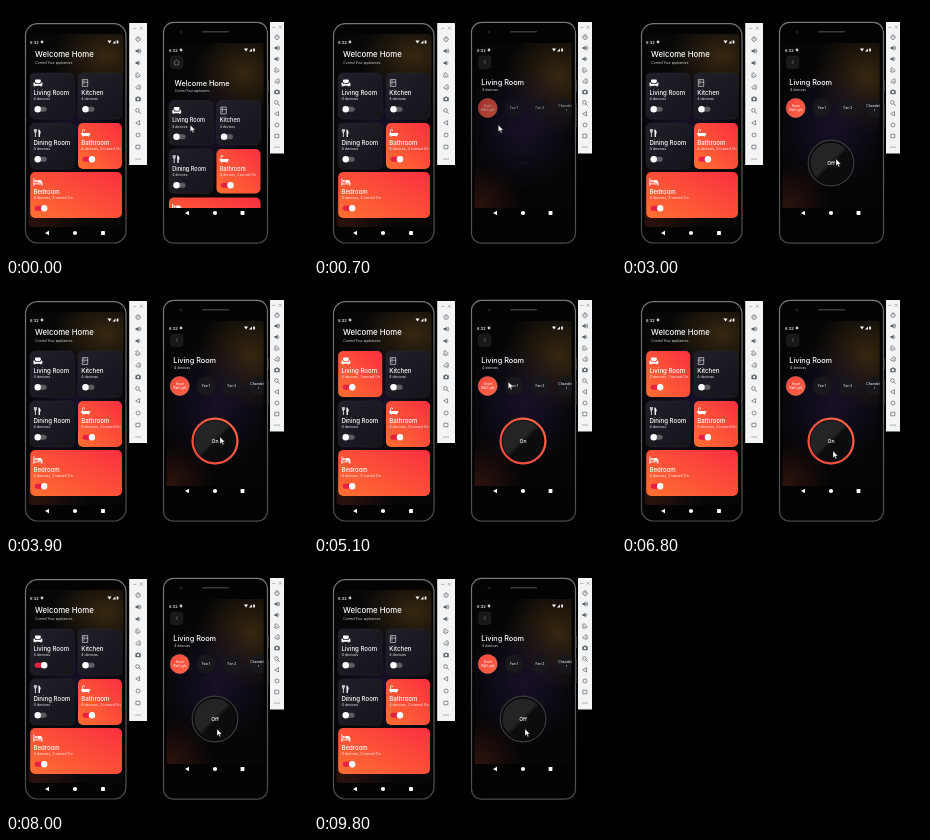
These frames come from a looping animation (302x250 px, 10 s). An HTML page:

```html
<!DOCTYPE html>
<html lang="en">
<head>
<meta charset="utf-8">
<title>Smart home</title>
<style>
html, body { margin: 0; width: 100%; height: 100%; overflow: hidden; background: #000; }
svg { display: block; width: 302px; height: 250px; }
text { font-family: Inter, "Open Sans", sans-serif; fill: #fff; }
</style>
</head>
<body>
<svg id="stage" viewBox="0 0 302 250" xmlns="http://www.w3.org/2000/svg"></svg>
<script>
const LOOP = 10000;

const rect = (x, y, w, h, r, fill, more = '') =>
  `<rect x="${x}" y="${y}" width="${w}" height="${h}" rx="${r}" fill="${fill}" ${more}/>`;
const dot = (x, y, r, fill, more = '') =>
  `<circle cx="${x}" cy="${y}" r="${r}" fill="${fill}" ${more}/>`;
const glowSpot = (x, y, rx, ry, id) =>
  `<ellipse cx="${x}" cy="${y}" rx="${rx}" ry="${ry}" fill="url(#${id})"/>`;
const label = (x, y, size, str, more = '') =>
  `<text x="${x}" y="${y}" font-size="${size}" ${more}>${str}</text>`;
const group = (x, y, body, more = '') =>
  `<g transform="translate(${x} ${y})" ${more}>${body}</g>`;
const line = (d, color = '#fff', w = 0.8) =>
  `<path d="${d}" fill="none" stroke="${color}" stroke-width="${w}" stroke-linecap="round" stroke-linejoin="round"/>`;
const solid = (d, color = '#fff') => `<path d="${d}" fill="${color}"/>`;
const mid = 'text-anchor="middle"';
const bold = 'font-weight="550"';

// Room icons, each in a box of about 9 x 8
const icons = {
  sofa: solid('M1.6 3V1.4Q1.6.5 2.5.5H6.5Q7.4.5 7.4 1.4V3Q6.4 3.2 6.4 4.2H2.6Q2.6 3.2 1.6 3Z') +
    solid('M0 4.3Q0 3.4.9 3.4T1.8 4.3V5H7.2V4.3Q7.2 3.4 8.1 3.4T9 4.3V6.8H8V7.6H7V6.8H2V7.6H1V6.8H0Z'),
  fridge: line('M1.5.6H6.5V7.4H1.5ZM1.5 3.2H6.5M2.8 1.6V2.3M2.8 4.3V5.4', '#ddd', 0.7),
  fork: line('M1 .5V2.5Q1 3.4 2 3.4T3 2.5V.5M2 .5V7.6', '#fff', 0.8) +
    solid('M5 .3Q7.3 1 7.3 4.6H6.5V7.9H5.2Z'),
  bed: line('M.5.8V7.4M.5 5.9H8.5M8.5 7.4V4.4', '#fff', 0.9) +
    dot(2.4, 3.1, 1.1, '#fff') + solid('M4 2H7Q8.8 2.2 8.8 4.8H4Z'),
  bath: line('M1.4 4V1.6Q1.4.6 2.4.6T3.4 1.6', '#fff', 0.8) +
    solid('M0 4H9V5Q9 6.8 7.4 6.9L7.8 7.7H7L6.6 7H2.4L2 7.7H1.2L1.6 6.9Q0 6.8 0 5Z'),
};

const OFF = [92, 92, 98], ON = [230, 32, 66];
const rgb = c => `rgb(${c.map(Math.round).join()})`;

const toggle = (x, y, on, id) => group(x, y,
  rect(0, -2.5, 12, 5, 2.5, rgb(on ? ON : OFF), id && `id="${id}Track"`) +
  dot(on ? 9.5 : 3, 0, 3.2, '#fff', id && `id="${id}Knob"`));

function card({ x, y, w, h, icon, name, size = 6.1, hot, live }) {
  const box = (fill, more = '') => rect(0, 0, w, h, 5, fill, more);
  let body = box(hot ? 'url(#hot)' : 'url(#dark)', hot ? '' : 'stroke="#29282f" stroke-width=".5"');
  if (live) body += box('url(#hot)', 'id="glow"');
  body += group(3.2, 6, icons[icon]) + label(3.2, 21.8, size, name, bold);
  body += label(3.2, 27.2, size * 0.6, hot ? '4 devices, 2 turned On' : '4 devices',
    `fill-opacity=".9" ${live ? 'id="note"' : ''}`);
  body += toggle(4.5, 36.3, hot, live ? 'live' : '');
  return group(x, y, body);
}

const rooms = [
  ['sofa', 'Living Room'], ['fridge', 'Kitchen'],
  ['fork', 'Dining Room'], ['bath', 'Bathroom', true],
];
const cards = (xs, ys, w, h, size, live) => rooms.map(([icon, name, hot], i) =>
  card({ x: xs[i % 2], y: ys[i >> 1], w, h, icon, name, hot, size, live: live && !i })).join('');

const navKeys = (xs, y) =>
  solid(`M${xs[0] + 2} ${y - 2.3}V${y + 2.3}L${xs[0] - 2} ${y}Z`) +
  dot(xs[1], y, 2.1, '#fff') + rect(xs[2] - 1.9, y - 1.9, 3.8, 3.8, 0.4, '#fff');

const status = (x, end, y) =>
  label(x, y + 1.5, 4, '6:32', bold) + dot(x + 12, y, 1.4, '#ccc') +
  solid(`M${end - 8} ${y - 1.5}H${end - 4}L${end - 6} ${y + 1.6}Z`) +
  solid(`M${end - 3} ${y + 1.6}L${end} ${y - 1.6}V${y + 1.6}Z`) +
  rect(end + 1.2, y - 1.6, 1.7, 3.2, 0.3, '#fff');

// Emulator side bar
function sideBar(x, y, w, h, first, step) {
  const ink = '#5b646b';
  const speaker = 'M-2.5-1H-1L.6-2.4V2.4L-1 1H-2.5Z';
  const tools = [
    line('M-1.4-1.5A2.2 2.2 0 1 0 1.4-1.5M0-2.6V0', ink),
    solid(speaker, ink) + line('M1.5-1.2Q2.5 0 1.5 1.2M2.2-2Q3.7 0 2.2 2', ink, 0.6),
    solid(speaker, ink) + line('M1.5-1.2Q2.5 0 1.5 1.2', ink, 0.6),
    line('M-.7-2.2L2.2.7L.7 2.2L-2.2-.7ZM-2.6.8Q-2.3 2.4-.8 2.7', ink),
    line('M.7-2.2L-2.2.7L-.7 2.2L2.2-.7ZM2.6.8Q2.3 2.4.8 2.7', ink),
    rect(-2.7, -1.8, 5.4, 4, 0.6, ink) + rect(-1, -2.5, 2, 1, 0.2, ink) + dot(0, 0.2, 1.1, '#fff'),
    line('M.9.9L2.4 2.4', ink) + dot(-0.6, -0.6, 1.8, 'none', `stroke="${ink}" stroke-width=".7"`),
    line('M1.5-2V2L-2 0Z', ink, 0.7),
    dot(0, 0, 2, 'none', `stroke="${ink}" stroke-width=".7"`),
    line('M-1.8-1.8H1.8V1.8H-1.8Z', ink, 0.7),
    [-2, 0, 2].map(v => dot(v, 0, 0.6, ink)).join(''),
  ];
  const cx = x + w / 2;
  return rect(x, y, w, h, 0.5, '#f3f4f5') +
    line(`M${cx + 2} ${y + 4}l2.4 2.4m0-2.4l-2.4 2.4M${cx - 4.5} ${y + 5.4}h2.5`, '#777', 0.5) +
    tools.map((icon, i) => group(cx, first + i * step, icon)).join('');
}

const blob = (id, color, alpha) =>
  `<radialGradient id="${id}"><stop stop-color="${color}" stop-opacity="${alpha}"/>` +
  `<stop offset="1" stop-color="${color}" stop-opacity="0"/></radialGradient>`;
const ramp = (id, a, b, dir = 'x2="1" y2="1"', from = 0, to = 1) =>
  `<linearGradient id="${id}" ${dir}><stop offset="${from}" stop-color="${a}"/><stop offset="${to}" stop-color="${b}"/></linearGradient>`;
const clip = (id, body) => `<clipPath id="${id}">${body}</clipPath>`;

const defs = '<defs>' +
  ramp('hot', '#ff6f30', '#f92f40', 'x1="0" y1="1" x2="1" y2="0"') + ramp('dark', '#211f29', '#15141b') +
  ramp('ring', '#f0443d', '#ff6545') + ramp('dial', '#242427', '#0c0c0e', 'x2="1" y2="1"', 0.46, 0.54) +
  ramp('rim', '#77787b', '#4a4b4e', 'x2="0" y2="1"') +
  blob('olive', '#3f2d12', 0.85) + blob('violet', '#1d1330', 0.8) + blob('wine', '#35150f', 0.8) +
  clip('leftScreen', rect(22.5, 28, 95, 193, 4, '#fff')) +
  clip('rightScreen', rect(160.5, 37, 97, 165, 0, '#fff')) + '</defs>';

const leftPhone =
  rect(19.5, 17.6, 100.5, 219.4, 12, '#030303', 'stroke="url(#rim)" stroke-width="1.2"') +
  rect(120, 77, 0.9, 14, 0.4, '#444') + rect(120, 99, 0.9, 22, 0.4, '#3a3a3a') +
  '<g clip-path="url(#leftScreen)">' + rect(22, 28, 96, 193, 0, '#070708') +
  glowSpot(100, 50, 56, 40, 'olive') + glowSpot(70, 120, 54, 60, 'violet') +
  glowSpot(30, 215, 50, 36, 'wine') + '</g>' +
  status(24, 109.5, 36) +
  label(29, 51, 7.8, 'Welcome Home', bold) +
  label(29.3, 57.8, 3.3, 'Control Your appliances', 'fill-opacity=".85"') +
  cards([24.2, 72], [67, 117], 44, 46, 6.1, true) +
  card({ x: 24.2, y: 166, w: 91.8, h: 46, icon: 'bed', name: 'Bedroom', hot: true }) +
  navKeys([41, 69, 97], 227);

const cornerButton = icon =>
  rect(164.5, 50, 12.5, 12.5, 3, '#18181b', 'stroke="#2b2b2e" stroke-width=".4"') + line(icon, '#8b8b8e', 0.6);

const homePage =
  glowSpot(238, 67, 52, 46, 'olive') + glowSpot(205, 130, 54, 54, 'violet') +
  cornerButton('M168 56.2L170.7 53.7L173.4 56.2M168.7 56V59H172.7V56') +
  label(168.5, 80, 7.3, 'Welcome Home', bold) +
  label(168.8, 86.4, 3.1, 'Control Your appliances', 'fill-opacity=".85"') +
  cards([163, 210.5], [94.5, 143], 44, 44.5, 5.6) +
  card({ x: 163, y: 191.5, w: 91.5, h: 44, icon: 'bed', name: 'Bedroom', size: 5.6, hot: true });

const chip = (x, lines, on) =>
  dot(x, 102, 9.5, on ? 'url(#ring)' : '#17171c', on ? 'stroke="#ff7a68" stroke-width=".5"' : '') +
  lines.map((s, i) => label(x, 103.2 + (i - (lines.length - 1) / 2) * 3.7, on ? 2.9 : 3.4, s, mid)).join('');

const detailPage = rect(160, 37, 98, 166, 0, '#050506') +
  glowSpot(244, 72, 54, 56, 'olive') + glowSpot(210, 121, 58, 62, 'violet') +
  glowSpot(165, 200, 44, 44, 'wine') +
  cornerButton('M171.6 54.5L169.9 56.2L171.6 57.9') +
  label(167.3, 79, 7.3, 'Living Room', bold) +
  label(168, 84.9, 3.5, '4 devices', 'fill-opacity=".85"') +
  '<g id="chips">' + chip(173.7, ['Smart', 'Wall Light'], true) + chip(200, ['Fan 1']) +
  chip(226, ['Fan 2']) + chip(252.3, ['Chandelie', 'r']) + '</g><g id="dialBox">' +
  dot(209, 157, 22.8, '#09090a', 'stroke="#3a3b3e" stroke-width="1.2"') +
  dot(209, 157, 20.5, 'url(#dial)') +
  dot(209, 157, 22.4, 'none', 'id="ringArc" stroke="url(#ring)" stroke-width="2.2" pathLength="100" transform="rotate(-90 209 157)"') +
  label(209, 158.8, 5.2, 'Off', `id="state" ${bold} ${mid}`) + '</g>';

const rightPhone =
  rect(157.5, 16.4, 104, 220.8, 10, '#030304', 'stroke="url(#rim)" stroke-width="1.2"') +
  rect(261.6, 74, 1, 12, 0.3, '#555') + rect(261.6, 97, 1, 24, 0.3, '#444') +
  rect(196, 25, 27, 1.6, 0.8, '#3a3c40') + dot(175, 26, 1.6, '#1d1f23') +
  '<g clip-path="url(#rightScreen)">' + rect(160, 37, 98, 176, 0, '#060607') +
  homePage + '<g id="detail">' + detailPage + '</g></g>' +
  status(163, 246, 44) + navKeys([181, 209, 236.5], 207);

const pointer = '<g id="pointer"><path transform="scale(.85)" d="M0 0V8L1.9 6.3L3.1 9L4.4 8.4L3.2 5.8H5.7Z" fill="#fff" stroke="#222" stroke-width=".4"/></g>';

document.getElementById('stage').innerHTML = defs + rect(0, 0, 302, 250, 0, '#000') +
  leftPhone + sideBar(123.2, 17, 17.8, 142, 33, 12) +
  rightPhone + sideBar(264, 16, 14, 131.5, 31, 11) + pointer;

const ui = {};
for (const id of ['glow', 'note', 'liveTrack', 'liveKnob', 'detail', 'chips', 'dialBox', 'ringArc', 'state', 'pointer'])
  ui[id] = document.getElementById(id);

const ease = p => p < 0.5 ? 2 * p * p : 1 - 2 * (1 - p) * (1 - p);
// Steps: [time, value, ...]; values ease between neighbours
function track(steps, t) {
  let a = steps[0];
  for (const b of steps) {
    if (t < b[0]) {
      const p = ease((t - a[0]) / (b[0] - a[0]));
      return a.slice(1).map((v, i) => v + (b[i + 1] - v) * p);
    }
    a = b;
  }
  return a.slice(1);
}

const moves = {
  pointer: [[0, 184.3, 119], [2150, 184.3, 119], [2700, 214, 153], [4400, 214, 153],
    [5000, 194.3, 98], [5750, 194.3, 98], [6450, 211, 167]],
  page: [[0, 0], [150, 0], [600, 1]],
  chips: [[0, 0], [400, 0], [900, 1]],
  dial: [[0, 0], [600, 0], [1200, 1]],
  ring: [[0, 0], [3450, 0], [3800, 1], [6950, 1], [7350, 0]],
  glow: [[0, 0], [3950, 0], [4300, 1], [7500, 1], [7900, 0]],
  knob: [[0, 0], [3950, 0], [4250, 1], [8050, 1], [8300, 0]],
};

function draw(now) {
  const at = {};
  for (const key in moves) at[key] = track(moves[key], now % LOOP);
  const [x, y] = at.pointer;
  const [page] = at.page, [ring] = at.ring, [glow] = at.glow, [knob] = at.knob;
  const set = (node, name, v) => node.setAttribute(name, v);

  set(ui.pointer, 'transform', `translate(${x} ${y})`);
  set(ui.detail, 'opacity', page);
  set(ui.detail, 'transform', `translate(0 ${(1 - page) * 12})`);
  set(ui.chips, 'opacity', at.chips[0]);
  set(ui.dialBox, 'opacity', at.dial[0]);
  set(ui.ringArc, 'stroke-dasharray', `${ring * 100} 101`);
  set(ui.ringArc, 'opacity', ring > 0 ? 1 : 0);
  ui.state.textContent = ring > 0.5 ? 'On' : 'Off';
  set(ui.glow, 'opacity', glow);
  ui.note.textContent = glow > 0.5 ? '4 devices, 1 turned On' : '4 devices';
  set(ui.liveKnob, 'cx', 3 + 6.5 * knob);
  set(ui.liveTrack, 'fill', rgb(OFF.map((v, i) => v + (ON[i] - v) * knob)));
}

const start = performance.now();
function tick() {
  draw(performance.now() - start);
  requestAnimationFrame(tick);
}
tick();
</script>
</body>
</html>
```
